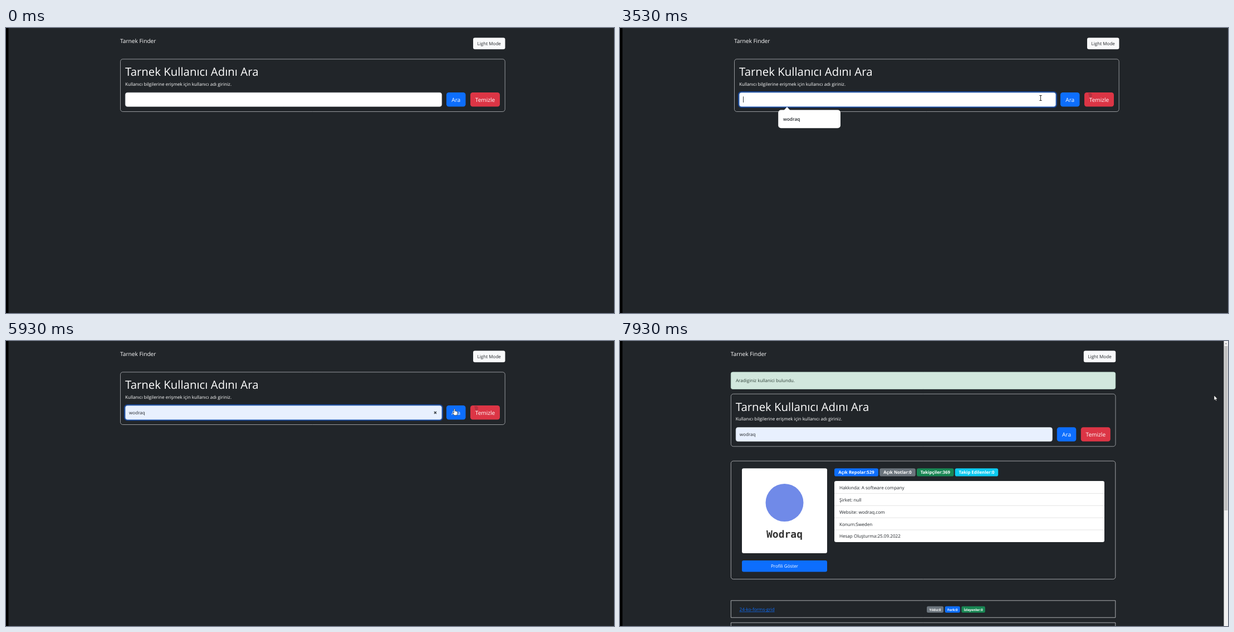
Write an HTML page with a canvas that moves like this. It is 1092 by 513 pixels and loops after 7990 ms.

```html
<!DOCTYPE html>
<html lang="tr">
<head>
<meta charset="utf-8">
<title>Finder</title>
<style>
  html, body { margin: 0; width: 100%; height: 100%; overflow: hidden; background: #212529; }
  canvas { display: block; }
</style>
</head>
<body>
<canvas id="stage" width="1092" height="513"></canvas>
<script>
const ctx = document.getElementById('stage').getContext('2d');
const LOOP = 7990;
const SANS = '"Open Sans", "Noto Sans", sans-serif';
const MONO = '"DejaVu Sans Mono", monospace';
const INK = '#212529', BLUE = '#0d6efd', RED = '#dc3545', GREY = '#6c757d', GREEN = '#198754', CYAN = '#0dcaf0';
const BODY = 8.1, LARGE = 10.15;
const USER = 'wodraq';
const RESULT_AT = 6740;

// Pointer moves: start, end, steps, target x, target y
const MOVES = [
  [870, 990, 3, 884, 297],
  [1240, 1360, 3, 841, 78],
  [1600, 1790, 4, 862, 28],
  [2530, 2530, 1, 798, 73],
  [2594, 3040, 8, 755.5, 126],
  [3780, 3910, 3, 400, 214],
  [4090, 4410, 6, 309.5, 157],
  [5420, 5540, 3, 660, 164],
  [5740, 5930, 4, 805.5, 122],
  [5990, 6060, 2, 813, 120],
  [7430, 7490, 2, 907, 128],
  [7740, 7930, 4, 1067, 98]
];

// Stepped progress: the first step already shows at the start time
function prog(t, start, end, n) {
  if (t < start) return 0;
  const step = (end - start) / (n - 1) || 1;
  return Math.min(1, (Math.floor((t - start) / step + 0.25) + 1) / n);
}

function box(x, y, w, h, r, fill, line, lw = 0.8) {
  ctx.beginPath();
  ctx.roundRect(x, y, w, h, r);
  if (fill) { ctx.fillStyle = fill; ctx.fill(); }
  if (line) { ctx.strokeStyle = line; ctx.lineWidth = lw; ctx.stroke(); }
}

function text(s, x, y, size, color, { weight = 400, align = 'left', font = SANS } = {}) {
  ctx.font = `${weight} ${size}px ${font}`;
  ctx.textAlign = align;
  ctx.fillStyle = color;
  ctx.fillText(s, x, y);
}

function button(s, x, y, w, h, fill, color, size, shade = 0) {
  box(x, y, w, h, size > 9 ? 4.3 : 3.2, fill);
  if (shade) box(x, y, w, h, size > 9 ? 4.3 : 3.2, `rgba(0,0,0,${shade})`);
  text(s, x + w / 2, y + h / 2 + size * 0.37, size, color, { align: 'center' });
}

function badge(s, x, y, w, h, fill, size) {
  box(x, y, w, h, size * 0.4, fill);
  text(s, x + w / 2, y + h / 2 + size * 0.37, size, '#fff', { weight: 700, align: 'center' });
}

function cross(x, y, r, lw) {
  ctx.beginPath();
  ctx.moveTo(x - r, y - r); ctx.lineTo(x + r, y + r);
  ctx.moveTo(x + r, y - r); ctx.lineTo(x - r, y + r);
  ctx.strokeStyle = '#343a40';
  ctx.lineWidth = lw;
  ctx.stroke();
}

function poly(points) {
  ctx.beginPath();
  points.forEach(([x, y]) => ctx.lineTo(x, y));
  ctx.closePath();
}

function header(t) {
  text('Tarnek Finder', 205, 27.3, LARGE, '#fff');
  const hover = prog(t, 1850, 1970, 3) - prog(t, 2594, 2720, 3);
  button('Light Mode', 839, 17.5, 57.5, 20.8, '#f8f9fa', INK, BODY, 0.15 * hover);
}

function searchCard(t) {
  box(205.5, 56, 690.7, 94.5, 4.3, null, '#b4b7ba');
  text('Tarnek Kullanıcı Adını Ara', 214, 86.2, 20.4, '#fff', { weight: 500 });
  text('Kullanıcı bilgilerine erişmek için kullanıcı adı giriniz.', 214, 104, BODY, '#fff');

  const focus = prog(t, 3290, 3410, 3) - prog(t, 6500, 6620, 3);
  const filled = t >= 4340;
  if (focus > 0) box(213, 115, 571, 27.4, 5.2, null, `rgba(20,90,215,${0.6 * focus})`, 2.2);
  box(214.3, 116.2, 568.4, 25.2, 4, filled ? '#e8f0fe' : '#fff', focus > 0 ? '#86b7fe' : '#ced4da', 0.6);
  if (filled) text(USER, 221, 131.8, BODY, INK);
  ctx.fillStyle = INK;
  if (t >= 3290 && t < 3780) ctx.fillRect(221, 123.3, 0.9, 10.8);
  if (t >= 4790 && t < 5420) ctx.fillRect(249.6, 123.3, 0.9, 10.8);
  if (t >= 4790 && t < 6500) cross(771, 129, 2, 1.4);

  const hover = t >= 6810 ? 0 : t >= 6500 ? 0.2 : 0.15 * prog(t, 5990, 6180, 4);
  button('Ara', 791, 116, 34.5, 25.5, BLUE, '#fff', LARGE, hover);
  button('Temizle', 834, 116, 53, 25.5, RED, '#fff', LARGE);
  if (t >= 2530 && t < RESULT_AT) {
    ctx.globalAlpha = 0.2;
    poly([[841, 117], [846, 117], [848, 120], [847, 125], [843, 125]]);
    ctx.fillStyle = INK;
    ctx.fill();
    ctx.globalAlpha = 1;
  }
}

function suggestion(t) {
  const gone = prog(t, 4980, 5170, 4);
  const alpha = prog(t, 3350, 3530, 4) * (1 - (gone <= 0.25 ? gone * 0.8 : gone));
  if (alpha <= 0) return;
  ctx.save();
  ctx.globalAlpha = alpha;
  const scale = 1 - 0.06 * gone;
  ctx.translate(340, 164);
  ctx.scale(scale, scale);
  ctx.translate(-340, -164);
  poly([[294, 148.5], [300, 142], [306, 148.5]]);
  ctx.fillStyle = '#fff';
  ctx.fill();
  box(284.2, 147.6, 111.8, 32.6, 5, '#fff');
  const hover = t >= 4340;
  if (hover) box(287.5, 151.5, 105, 24.5, 3, '#ebebeb');
  text(USER, 293, 166.5, 8.3, INK, { weight: 600 });
  if (hover) cross(380, 163.3, 2.9, 1.2);
  ctx.restore();
}

function profile() {
  box(199.3, 216, 690.5, 212.7, 4.3, null, '#c3c5c7');
  box(219, 229.3, 153, 152.7, 3, '#fff');
  ctx.beginPath();
  ctx.arc(295.5, 291, 34, 0, 7);
  ctx.fillStyle = '#708ae8';
  ctx.fill();
  text('Wodraq', 295.5, 354, 18, '#333', { weight: 700, align: 'center', font: MONO });
  button('Profili Göster', 219, 395, 153, 20.5, BLUE, '#fff', BODY);

  badge('Açık Repolar:529', 385, 229.3, 79, 14.2, BLUE, 7.8);
  badge('Açık Notlar:0', 466.3, 229.3, 64.5, 14.2, GREY, 7.8);
  badge('Takipçiler:369', 533, 229.3, 66.5, 14.2, GREEN, 7.8);
  badge('Takip Edilenler:0', 601.7, 229.3, 77.5, 14.2, CYAN, 7.8);

  box(385, 252, 485, 110, 3.2, '#fff');
  ['Hakkında: A software company', 'Şirket: null', `Website: ${USER}.com`, 'Konum:Sweden', 'Hesap Oluşturma:25.09.2022']
    .forEach((s, i) => {
      const y = 252 + i * 21.9;
      if (i) { ctx.fillStyle = '#dcdcdc'; ctx.fillRect(385, y, 485, 0.8); }
      text(s, 394, y + 14.8, BODY, INK);
    });
}

function repos() {
  box(199.3, 467.2, 690.5, 30.6, 0, null, '#d2d4d6');
  box(199.3, 507, 690.5, 30.6, 0, null, '#d2d4d6');
  const name = '24-ko-forms-grid';
  text(name, 214.5, 486, BODY, BLUE);
  ctx.fillRect(214.5, 487.2, ctx.measureText(name).width, 0.7);
  badge('Yıldız:0', 551, 477.5, 30, 11.6, GREY, 6);
  badge('Fork:0', 583.7, 477.5, 27, 11.6, BLUE, 6);
  badge('İzleyenler:0', 613.3, 477.5, 42.5, 11.6, GREEN, 6);
}

function scrollbar() {
  ctx.fillStyle = '#f1f1f1';
  ctx.fillRect(1084.5, 0, 7.5, 513);
  ctx.fillStyle = '#c1c1c1';
  ctx.fillRect(1085.5, 9, 5.8, 296);
  poly([[1086.6, 5.5], [1088.4, 3.4], [1090.2, 5.5]]);
  ctx.fillStyle = '#777';
  ctx.fill();
}

function pointerAt(t) {
  let x = 1010, y = 537;
  for (const [start, end, n, tx, ty] of MOVES) {
    const p = prog(t, start, end, n);
    x += (tx - x) * p;
    y += (ty - y) * p;
  }
  return [x, y];
}

function pointerKind(t, x, y) {
  if (t >= 6500) return 'arrow';
  const inside = (l, top, r, b) => x > l && x < r && y > top && y < b;
  if (inside(839, 17, 897, 39) || inside(791, 116, 826, 142)) return 'hand';
  return inside(214, 116, 783, 142) ? 'beam' : 'arrow';
}

function pointer(t) {
  if (t < 870) return;
  const [x, y] = pointerAt(t);
  const kind = pointerKind(t, x, y);
  ctx.save();
  ctx.translate(x, y);
  ctx.lineJoin = 'round';
  ctx.lineWidth = 0.6;
  ctx.strokeStyle = '#111';
  ctx.fillStyle = '#fff';
  if (kind === 'beam') {
    ctx.lineWidth = 0.9;
    ctx.beginPath();
    ctx.moveTo(-2.2, -4.5); ctx.lineTo(2.2, -4.5);
    ctx.moveTo(0, -4.5); ctx.lineTo(0, 4.5);
    ctx.moveTo(-2.2, 4.5); ctx.lineTo(2.2, 4.5);
  } else if (kind === 'hand') {
    ctx.beginPath();
    ctx.moveTo(-1, 7.5);
    ctx.lineTo(-1, 0.8);
    ctx.quadraticCurveTo(0, -0.8, 1, 0.8);
    ctx.lineTo(1, 4);
    ctx.lineTo(4.6, 4.8);
    ctx.quadraticCurveTo(5.8, 5.2, 5.6, 7);
    ctx.lineTo(4.5, 11.8);
    ctx.lineTo(-0.6, 11.8);
    ctx.lineTo(-3.5, 7.6);
    ctx.quadraticCurveTo(-3, 6, -1, 7.5);
    ctx.fill();
  } else {
    poly([[0, 0], [0, 8.7], [2, 6.9], [3.4, 9.8], [4.8, 9.2], [3.5, 6.4], [6.2, 6.2]]);
    ctx.fill();
  }
  ctx.stroke();
  ctx.restore();
}

function draw(t) {
  const found = t >= RESULT_AT;
  ctx.fillStyle = INK;
  ctx.fillRect(0, 0, 1092, 513);
  ctx.fillStyle = '#000';
  ctx.fillRect(0, 0, 4.4, 513);
  ctx.textRendering = 'geometricPrecision';

  ctx.save();
  if (found) ctx.translate(-6.2, 0);
  header(t);
  if (found) ctx.translate(0, 39.3);
  searchCard(t);
  ctx.restore();

  if (found) {
    box(199.3, 56, 690.5, 30.5, 3.2, '#d1e7dd', '#badbcc');
    text('Aradiginiz kullanici bulundu.', 208, 74.2, BODY, '#2f4038');
    profile();
    repos();
    scrollbar();
  }
  suggestion(t);
  pointer(t);
}

let begin;
function tick(now) {
  begin ??= now;
  draw((now - begin) % LOOP);
  requestAnimationFrame(tick);
}
requestAnimationFrame(tick);
</script>
</body>
</html>
```
